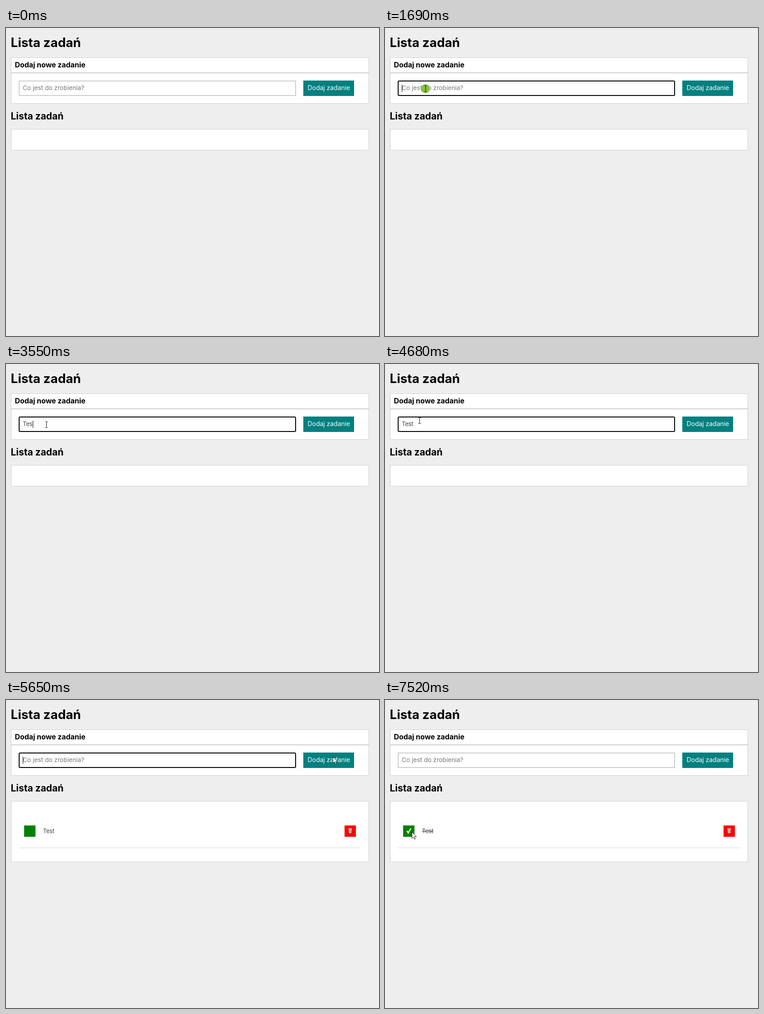
Write an HTML page that moves like this. It is 823 by 680 pixels and loops after 8000 ms.

```html
<!DOCTYPE html>
<html lang="pl">
<head>
<meta charset="utf-8">
<title>Lista zadań</title>
<style>
  html, body { margin: 0; width: 100%; height: 100%; overflow: hidden; background: #eee; }
  svg { display: block; width: 823px; height: 680px; }
  text { font-family: Inter, "Open Sans", sans-serif; font-size: 13.7px; white-space: pre; }
  .head { font-weight: 700; }
  .h1 { font-size: 27.8px; }
  .h2 { font-size: 20.9px; }
  .h3 { font-size: 15.9px; }
  .button { font-size: 13.95px; fill: #fff; }
  .panel { fill: #fff; stroke: #d0d0d0; }
  .word { font-size: 13px; letter-spacing: -.2px; fill: #444; }
  .done { text-decoration: line-through; }
  .sharp { shape-rendering: crispEdges; }
</style>
</head>
<body>
<svg viewBox="0 0 823 680">
  <rect width="823" height="680" fill="#eee"/>
  <text class="head h1" x="10.5" y="42">Lista zadań</text>

  <rect class="panel" x="11.5" y="65.5" width="789" height="101"/>
  <rect class="sharp" x="11" y="98" width="790" height="2" fill="#d0d0d0"/>
  <text class="head h3" x="19.5" y="87">Dodaj nowe zadanie</text>

  <rect id="field" x="29" y="117" width="610" height="32" fill="#fff" stroke-width="2"/>
  <text id="hint" x="37" y="137" fill="#757a75">Co jest do zrobienia?</text>
  <text id="typed" class="word" x="37" y="137"></text>
  <rect id="caret" class="sharp" y="125" width="1" height="16"/>

  <rect x="656" y="116" width="112" height="34" fill="#008080"/>
  <text class="button" x="665.5" y="137">Dodaj zadanie</text>

  <text class="head h2" x="10.5" y="202">Lista zadań</text>
  <rect id="list" class="panel" x="11.5" y="223.5" width="789" height="46"/>

  <g id="item">
    <rect x="40" y="277" width="25" height="25" fill="#008000"/>
    <path id="check" d="M47.3 289.6 49.4 288.3 51.4 290.9Q53.6 286.2 56.6 283L58.4 283.8Q54.5 289 52.4 295H50.4Q49.2 291.9 47.3 289.6Z" fill="#fff"/>
    <text id="label" class="word" x="81.5" y="294">Test</text>
    <rect x="747" y="277" width="25" height="25" fill="#f00"/>
    <path d="M756 285.5H762.6L762 294H756.6Z" fill="#d2cdc8"/>
    <path d="M755.2 284.4H763.4" stroke="#ddd" stroke-width="1.8"/>
    <path d="M757.6 286.5V293M759.3 286.5V293M761 286.5V293" stroke="#8d8480" stroke-width=".7"/>
    <rect class="sharp" x="28" y="326" width="756" height="1" fill="#d8d8d8"/>
  </g>

  <g id="pointer">
    <circle id="press" r="10" fill="#82c03a" opacity=".95"/>
    <path id="arrow" d="M.5.5V14.5L3.7 11.5 5.9 16.4 8.2 15.4 6.1 10.6H10.5Z" fill="#fff" stroke="#111" stroke-width=".9"/>
    <path id="beam" d="M-2.5-6.5H-.5L.5-6 1.5-6.5H3.5M.5-6V6M-2.5 6.5H-.5L.5 6 1.5 6.5H3.5" fill="none" stroke="#111"/>
  </g>
</svg>
<script>
const LOOP = 8000, BLINK = 530;
const $ = id => document.getElementById(id);
const show = (id, on) => $(id).setAttribute('visibility', on ? 'inherit' : 'hidden');
const within = (t, a, b) => t >= a && t < b;

const keys = [3010, 3280, 3550, 3750];
const caretX = [37, 45, 52, 59, 63];
const ADDED = 5650, DONE = 7520;
const focusSpans = [[1620, 5370], [ADDED, 7260]];
const presses = [[1620, 1750], [5370, ADDED], [7260, DONE]];

// Each move holds its place between screen updates: start, end, updates, Bezier points.
const moves = [
  [540, 1160, 10, [[745, 560], [520, 330], [110, -6], [89, 134]]],
  [4420, 4420, 1, [[85, 129]]],
  [4680, 5170, 8, [[76, 125], [290, 110], [510, 124], [719, 130]]],
  [5370, 5370, 1, [[721, 125]]],
  [5980, 6640, 11, [[719, 127], [500, 170], [280, 260], [59, 291]]]
];

const smooth = p => p * p * (3 - 2 * p);

function bezier(points, p) {
  while (points.length > 1)
    points = points.slice(1).map((b, i) => b.map((v, k) => points[i][k] + (v - points[i][k]) * p));
  return points[0];
}

function pointerAt(t) {
  const move = moves.filter(m => m[0] <= t).pop();
  if (!move) return null;
  const [start, end, count, points] = move;
  if (count === 1) return points[0];
  const step = Math.min(count - 1, Math.floor((t - start) / (end - start) * (count - 1) + 1e-6));
  return bezier(points, smooth(step / (count - 1)));
}

function drawPointer(t) {
  const at = pointerAt(t);
  show('pointer', at);
  if (!at) {
    ['beam', 'arrow', 'press'].forEach(id => show(id, false));
    return;
  }
  const [x, y] = at.map(Math.round);
  const overField = within(x, 28, 640) && within(y, 116, 150);
  $('pointer').setAttribute('transform', `translate(${x} ${y})`);
  show('beam', overField);
  show('arrow', !overField);
  show('press', presses.some(([a, b]) => within(t, a, b)));
}

function drawField(t) {
  const span = focusSpans.find(([a, b]) => within(t, a, b));
  const typed = t < ADDED ? keys.filter(k => k <= t) : [];
  const field = $('field');
  field.setAttribute('stroke', span ? '#000' : '#ccc');
  field.setAttribute('rx', span ? 2 : 0);
  $('typed').textContent = 'Test'.slice(0, typed.length);
  show('hint', !typed.length);
  $('caret').setAttribute('x', caretX[typed.length]);
  const since = span ? t - Math.max(span[0], ...typed) : 0;
  show('caret', span && Math.floor(since / BLINK) % 2 === 0);
}

function drawList(t) {
  const added = t >= ADDED, done = t >= DONE;
  $('list').setAttribute('height', added ? 134 : 46);
  show('item', added);
  show('check', done);
  $('label').classList.toggle('done', done);
}

function draw(now) {
  const t = now % LOOP;
  drawField(t);
  drawList(t);
  drawPointer(t);
}

let begin;
function tick(now) {
  begin ??= now;
  draw(now - begin);
  requestAnimationFrame(tick);
}
draw(0);
requestAnimationFrame(tick);
</script>
</body>
</html>
```
